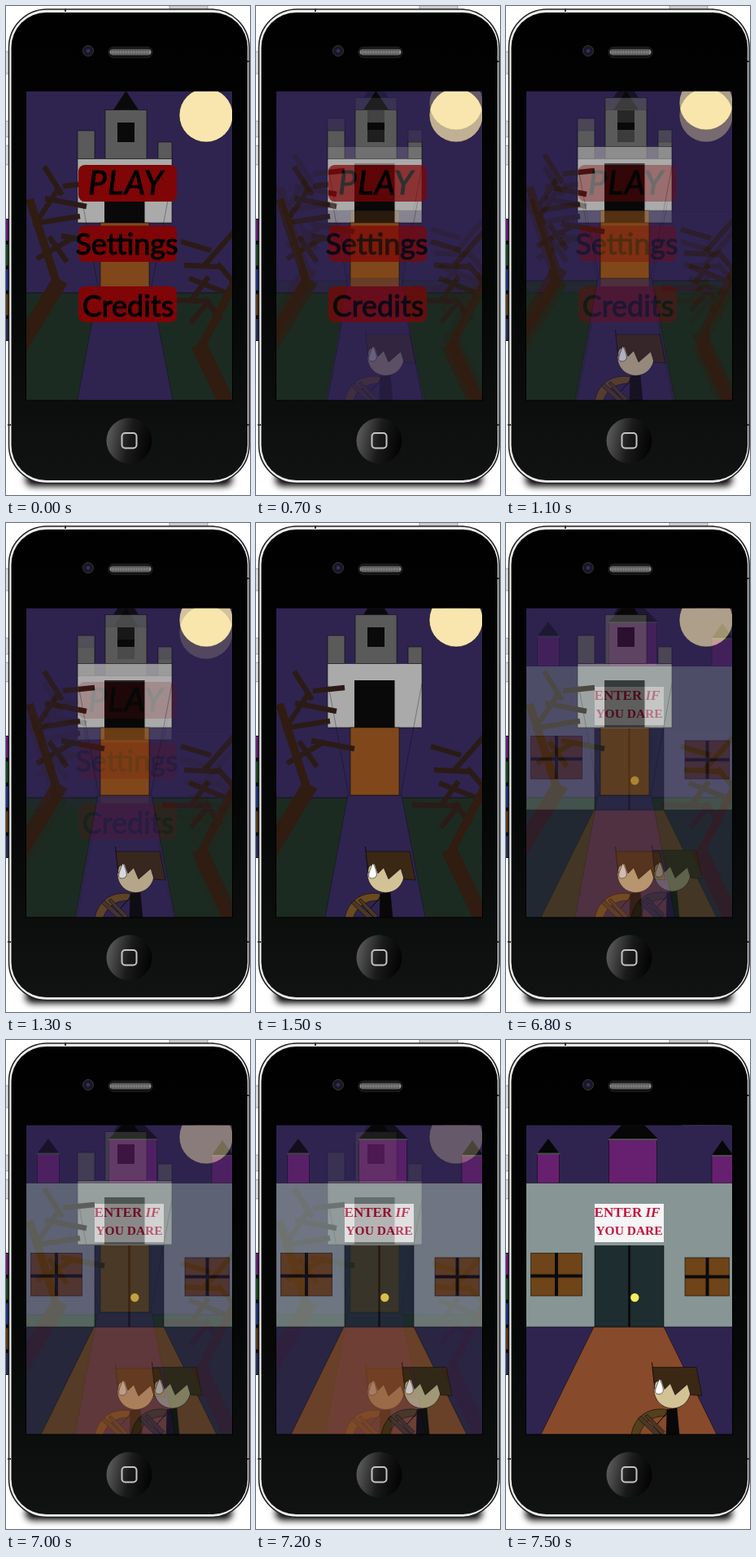
Animation, 300 px wide and 600 px high, one loop 8000 ms. Source, as an HTML page:

```html
<!DOCTYPE html>
<html lang="en">
<head>
<meta charset="utf-8">
<title>Castle game on a phone</title>
<style>
  html, body { margin: 0; width: 100%; height: 100%; overflow: hidden; background: #fff; }
  svg { display: block; width: 100%; height: 100%; }
  .ink { stroke: #000; stroke-width: .7; stroke-opacity: .75; }
  .faint { stroke: #000; stroke-width: .6; stroke-opacity: .55; }
  .tree { fill: none; stroke: #2b1b16; stroke-width: 6.5; }
  .menu { font: 36px Lato, "Open Sans", sans-serif; text-anchor: middle; stroke: #000; stroke-width: 1; }
  .menu .play { font-size: 40px; font-style: italic; letter-spacing: 1.5px; }
  .sign { font: bold 17px "Liberation Serif", "Noto Serif", serif; text-anchor: middle; fill: #c4143c; }
  .sign .small { font-size: 15.5px; }
</style>
</head>
<body>
<svg viewBox="0 0 300 600">
  <defs>
    <clipPath id="screen"><rect x="25" y="104.5" width="253" height="379.5"/></clipPath>
    <filter id="blur" x="-10%" y="-100%" width="120%" height="300%"><feGaussianBlur stdDeviation="4"/></filter>
    <linearGradient id="glass" x2="0" y2="1">
      <stop offset="0" stop-color="#010101"/><stop offset=".6" stop-color="#050606"/>
      <stop offset="1" stop-color="#111313"/>
    </linearGradient>
    <linearGradient id="button" x1="0" y1=".4" x2="1" y2=".6">
      <stop offset="0" stop-color="#5c5c5c"/><stop offset=".5" stop-color="#1a1a1a"/>
      <stop offset="1" stop-color="#020202"/>
    </linearGradient>
    <linearGradient id="mesh" x2="0" y2="1">
      <stop offset="0" stop-color="#555"/><stop offset=".5" stop-color="#999"/>
      <stop offset="1" stop-color="#666"/>
    </linearGradient>
    <radialGradient id="lens">
      <stop offset="0" stop-color="#44446a"/><stop offset=".5" stop-color="#15152a"/>
      <stop offset="1" stop-color="#1c1c20"/>
    </radialGradient>

    <g id="castle">
      <rect x="0" y="60" width="300" height="440" fill="#2f2450"/>
      <rect class="ink" x="10" y="337" width="280" height="170" fill="#1c2b22"/>
      <path class="faint" d="M113 334H179L211 500H82Z" fill="#2f2450"/>
      <rect x="89" y="252" width="114" height="82" fill="#2f2450"/>
      <circle class="ink" cx="246" cy="119" r="33" fill="#f8e6ae"/>
      <path d="M147.500 89L163 112.500H132Z" fill="#0a0a0c"/>
      <g class="ink" fill="#5a5a5a">
        <rect x="122" y="112.500" width="51" height="60"/>
        <rect x="88" y="138" width="21" height="34.500"/>
        <rect x="187" y="152" width="17" height="20.500"/>
      </g>
      <rect x="137" y="128" width="21" height="24" fill="#0a0a0a"/>
      <rect class="ink" x="88" y="172.500" width="116" height="78.500" fill="#aaa"/>
      <rect x="121" y="193" width="49.500" height="58" fill="#090909"/>
      <rect class="ink" x="116" y="251" width="60" height="83" fill="#80481a"/>
      <path class="faint" d="M89 199L114 334M204 197L178 334" fill="none"/>
      <g class="tree">
        <path d="M47 182L69 217M70 206L109 202M48 221L99 231M33 252L91 243M40 246L66 207M38 295L85 268M53 268L75 299M68 267L121 277"/>
        <path d="M215 274L252 285M244 303L281 261M219 303L262 305M260 301L280 324M225 319L281 341M228 346L249 317M227 374L251 345M192 346L250 347M244 343L264 370"/>
        <g stroke="#301c11">
          <path d="M29 222L62 324M240 403L281 324" stroke-width="10"/>
          <path d="M13 410L67 321M237 400L282 495" stroke-width="19.500"/>
        </g>
      </g>
    </g>

    <g id="hero">
      <path class="ink" d="M153 455L165 453L168 486H152Z" fill="#080808"/>
      <path class="ink" d="M109 486C112 466 128 451 153 455L151 463C133 463 123 472 119 486Z"/>
      <path d="M153 459L137 477" stroke="#000"/>
      <path class="ink" d="M117 466L121 463L147 486H138ZM126 463L129 461L150 482L146 486Z" fill="#4a3826"/>
      <circle class="ink" cx="159.500" cy="431" r="22.500" fill="#d3c296"/>
      <path d="M134.500 397L138 430" stroke="#000" stroke-width=".8" fill="none"/>
      <path class="ink" d="M135 403H189L196 438L182 437L178 424L163 437L157 423L150 430L146 418L137 422Z" fill="#3a2815"/>
      <path class="ink" d="M143.500 417C147 423 149 430 148 433C146 437 139 437 138.500 433C138.500 428 142 423 143.500 417Z" fill="#fff"/>
    </g>
  </defs>

  <!-- phone -->
  <rect x="24" y="572" width="254" height="17" rx="8" filter="url(#blur)"/>
  <rect x="201" y="-2" width="47" height="8" rx="2" fill="#ccc" stroke="#999"/>
  <g fill="#ddd" stroke="#999" stroke-width=".8">
    <rect x="-2" y="56" width="6" height="27" rx="1"/>
    <rect x="-2" y="141" width="6" height="20" rx="3"/>
    <rect x="-2" y="171" width="6" height="24" rx="3"/>
  </g>
  <rect x="3.500" y="4" width="295.500" height="581.500" rx="47" fill="#eee" stroke="#222" stroke-width="1.600"/>
  <path d="M2 514h4M296 514h4M296 68h4M73 3v4" stroke="#333" stroke-width="2"/>
  <rect x="6.500" y="8" width="290.500" height="574" rx="43" fill="url(#glass)"/>
  <g id="strip"></g>
  <circle cx="101" cy="55" r="6.500" fill="url(#lens)" stroke="#333338"/>
  <rect x="126" y="50.500" width="54" height="12.500" rx="6" fill="#080808" stroke="#2c2c2c"/>
  <rect x="127.500" y="52.500" width="51" height="8" rx="4" fill="url(#mesh)"/>
  <path d="M129 56.500H177" stroke="#333" stroke-width="7" stroke-dasharray=".6 1.400"/>
  <circle cx="151.500" cy="533.500" r="28" fill="url(#button)"/>
  <rect x="142.500" y="524" width="18" height="18.500" rx="4" fill="none" stroke="#c4c4c4" stroke-width="2"/>

  <g clip-path="url(#screen)">
    <g>
      <use href="#castle" y="15"/>
      <g fill="#7f0507">
        <rect x="89" y="195" width="121" height="45" rx="8"/>
        <rect x="89" y="269.500" width="121" height="44.500" rx="8"/>
        <rect x="89" y="344" width="121" height="44" rx="8"/>
      </g>
      <g class="menu">
        <text class="play" x="148" y="230.500">PLAY</text>
        <text x="148.500" y="305">Settings</text>
        <text x="150" y="380.500">Credits</text>
      </g>
    </g>

    <g id="road">
      <use href="#castle"/>
      <use href="#hero" fill="#6a4a1e"/>
    </g>

    <g id="door">
      <rect x="20" y="100" width="262" height="390" fill="#2f2450"/>
      <g fill="#672070" class="ink">
        <rect x="38.500" y="139" width="27" height="37"/>
        <rect x="126.500" y="121" width="59" height="55"/>
        <rect x="253" y="141.500" width="30" height="35"/>
      </g>
      <path d="M52 121L65.500 139H38.500ZM156 90L187 121.500H126ZM266 123L279.500 141.500H253Z" fill="#070708"/>
      <path d="M38 139.500H66M126 122H186M253 142H279" stroke="#4c4c4c" stroke-width="2"/>
      <rect class="ink" x="20" y="175.500" width="262" height="176.500" fill="#879695"/>
      <path class="ink" d="M108 352H194L260 486H42Z" fill="#874a2b"/>
      <rect x="109" y="201" width="85" height="47" fill="#f5f5f5"/>
      <g class="sign">
        <text x="149" y="217">ENTER <tspan font-style="italic">IF</tspan></text>
        <text class="small" x="151.500" y="239">YOU DARE</text>
      </g>
      <rect class="ink" x="109" y="252.500" width="85" height="99.500" fill="#1d2d30"/>
      <path d="M151.500 252V352" stroke="#070707" stroke-width="2.500"/>
      <circle cx="158.300" cy="316" r="5.200" fill="#f8ee5c"/>
      <g class="ink" fill="#6e4418">
        <rect x="30.500" y="261.500" width="63" height="52.500"/>
        <rect x="220" y="267" width="54.500" height="47"/>
      </g>
      <path d="M62 261V314M30 289.500H94M247.500 267V314M220 290.500H275" stroke="#0a0a0a" stroke-width="4"/>
      <use href="#hero" x="45" y="-1.500" fill="#54401c"/>
    </g>
  </g>
  <rect x="24.500" y="104" width="254" height="380" fill="none" stroke="#000"/>
</svg>
<script>
  const LOOP = 8000, STEP = 100, STEPS = 11;
  const road = document.getElementById("road");
  const door = document.getElementById("door");

  // Coloured blocks peeking in at the left edge
  const blocks = ["#6b1f74", "#1c4a24", "#22367c", "#5e3a18", "#2a2f58"];
  document.getElementById("strip").innerHTML =
    '<rect y="261" width="3" height="150" fill="#080808"/>' +
    blocks.map((c, i) => `<rect y="${262 + i * 30.5}" width="2.5" height="26" fill="${c}"/>`).join("");

  // Stepped cross-fade; the first step lands exactly on `start`
  const fade = (t, start) =>
    Math.max(0, Math.min(STEPS, Math.floor((t - start) / STEP) + 1)) / STEPS;

  function draw() {
    const t = performance.now() % LOOP;
    road.setAttribute("opacity", fade(t, 500));
    door.setAttribute("opacity", fade(t, 6500));
    requestAnimationFrame(draw);
  }
  draw();
</script>
</body>
</html>
```
